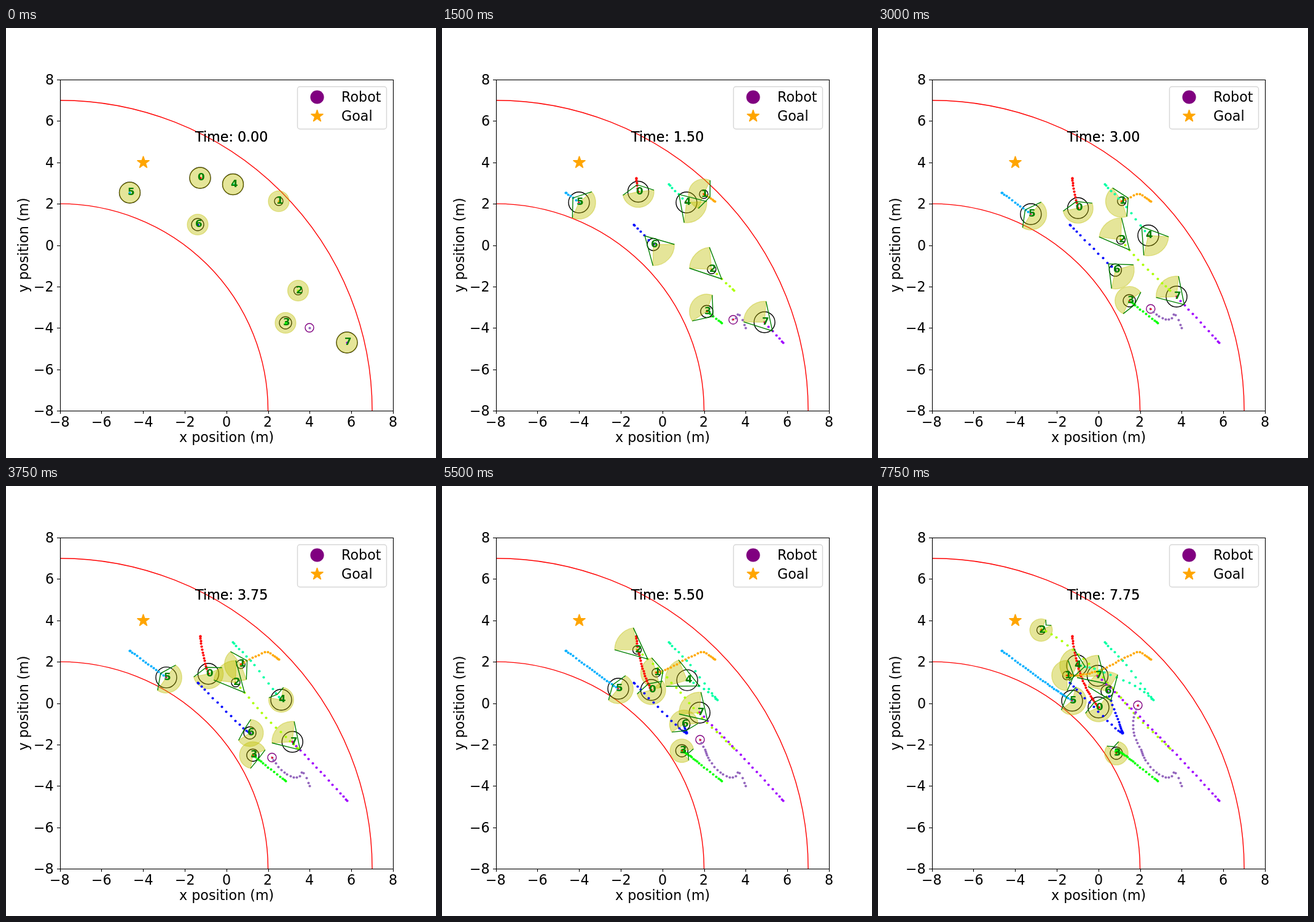
An HTML page with a canvas for the animation above (8 s loop, 700 px wide and 700 px high).

```html
<!DOCTYPE html>
<html>
<head>
<meta charset="utf-8">
<style>
  html, body { margin: 0; width: 100%; height: 100%; overflow: hidden; background: #fff; }
  canvas { display: block; }
</style>
</head>
<body>
<canvas id="stage" width="700" height="700"></canvas>
<script>
const ctx = document.getElementById('stage').getContext('2d');
const STEP = 0.25, LOOP = 8, METRE = 33.8, TAU = 2 * Math.PI;
const LEFT = 87.5, TOP = 84, WIDTH = 542.5, HEIGHT = 539, BOTTOM = TOP + HEIGHT;
const px = x => LEFT + (x + 8) / 16 * WIDTH;
const py = y => BOTTOM - (y + 8) / 16 * HEIGHT;
const snap = v => Math.floor(v) + 0.5;

// A path is a few points [time, x, y], passed smoothly from a standing start.
const walker = (radius, ...path) => ({ radius, path });

// Pedestrians cover 36% of the first leg in half its time while speeding up.
function pedestrian(radius, start, next, ...rest) {
  const half = start.map((v, i) => v + (i ? 0.36 : 0.5) * (next[i] - v));
  return walker(radius, start, half, next, ...rest);
}

const people = [
  pedestrian(17, [0, 316, 244], [1.5, 319.5, 266.5], [7.75, 359, 360.5]),
  pedestrian(7, [0, 444, 282], [1.5, 426, 270.5], [2.5, 406.5, 277.5], [4.75, 363, 299.5], [7.75, 307.5, 308.5]),
  pedestrian(7, [0, 475.5, 427.5], [1.5, 439, 393], [4.75, 343, 289], [6.5, 282, 241], [6.75, 273, 236], [7.25, 267.5, 234], [7.75, 265.5, 234.5]),
  pedestrian(10, [0, 455, 480], [1.5, 431, 461.5], [4.75, 394.5, 433], [7.75, 388, 435]),
  pedestrian(17, [0, 369.5, 254.5], [1.5, 398, 284], [3.25, 444, 343], [3.75, 448, 348], [4.75, 426, 330], [6.5, 360, 300.5], [7.75, 324, 292]),
  pedestrian(17, [0, 201.5, 268], [1.5, 223, 284], [7.75, 316, 349.5]),
  pedestrian(10, [0, 312, 320], [1.5, 344, 352.5], [3.25, 391, 398], [3.75, 397, 402], [4.75, 396.5, 397], [7.75, 373, 334]),
  pedestrian(17, [0, 555, 512], [1.5, 525, 479], [7.75, 357.5, 309])
];
people.forEach((p, i) => p.color = `hsl(${i * 39.7}, 100%, 50%)`);

const robot = walker(7, [0, 494, 488], [1, 481, 466], [1.25, 478, 472], [2.5, 453, 466],
  [3.75, 433, 442], [4.75, 428, 429], [6, 416, 401], [7.75, 423, 357]);
robot.color = '#9467bd';

const chord = (path, i, c) => (path[i + 1][c] - path[i][c]) / (path[i + 1][0] - path[i][0]);

function slope(path, i, c) {
  if (i === 0) return 0;
  if (i === path.length - 1) return 2 * chord(path, i - 1, c) - slope(path, i - 1, c);
  const before = path[i][0] - path[i - 1][0], after = path[i + 1][0] - path[i][0];
  return (chord(path, i - 1, c) * after + chord(path, i, c) * before) / (before + after);
}

// Cubic Hermite interpolation.
function positionAt(path, t) {
  let i = 0;
  while (i < path.length - 2 && t >= path[i + 1][0]) i++;
  const h = path[i + 1][0] - path[i][0], u = (t - path[i][0]) / h;
  return [1, 2].map(c => {
    const a = path[i][c], d = path[i + 1][c] - a;
    const m = slope(path, i, c) * h, n = slope(path, i + 1, c) * h;
    return a + u * (m + u * (3 * d - 2 * m - n + u * (m + n - 2 * d)));
  });
}

// Speed and heading come from the latest step.
function stateAt({ path }, t) {
  const [x, y] = positionAt(path, t), [x0, y0] = positionAt(path, Math.max(0, t - STEP));
  return { x, y, speed: Math.hypot(x - x0, y - y0) / STEP / METRE, heading: Math.atan2(y - y0, x - x0) };
}

function circle(x, y, r, fill, stroke) {
  ctx.beginPath();
  ctx.arc(x, y, r, 0, TAU);
  if (fill) { ctx.fillStyle = fill; ctx.fill(); }
  if (stroke) { ctx.strokeStyle = stroke; ctx.stroke(); }
}

function polyline(color, ...points) {
  ctx.strokeStyle = color;
  ctx.beginPath();
  points.forEach(p => ctx.lineTo(...p));
  ctx.stroke();
}

// The anchor is 0 for left, 0.5 for centre and 1 for right.
function text(str, x, y, anchor = 0, font = '22.22px', color = '#000') {
  ctx.font = font + ' "DejaVu Sans", sans-serif';
  ctx.fillStyle = color;
  ctx.fillText(str, Math.round(x - anchor * ctx.measureText(str).width), Math.round(y));
}

function star(x, y) {
  ctx.fillStyle = ctx.strokeStyle = '#ffa500';
  ctx.lineWidth = 1.4;
  ctx.lineJoin = 'bevel';
  ctx.beginPath();
  for (let i = 0; i < 10; i++) {
    const r = i % 2 ? 4 : 10.4, a = i * TAU / 10 - TAU / 4;
    ctx.lineTo(x + r * Math.cos(a), y + r * Math.sin(a));
  }
  ctx.closePath();
  ctx.fill();
  ctx.stroke();
  ctx.lineJoin = 'miter';
}

// The faster someone walks, the longer and narrower the personal space.
function spaceOf({ x, y, speed, heading }) {
  const half = TAU / 24 + 11 * TAU / 24 * Math.exp(-1.4 * speed);
  const reach = (0.5 + 0.43 * speed) * METRE;
  const back = (0.36 - 0.25 * speed + 0.36 * speed * speed) * METRE;
  const polar = (r, a) => [x + r * Math.cos(a), y + r * Math.sin(a)];
  return {
    half, reach,
    outline: [polar(reach, heading - half), polar(-back, heading), polar(reach, heading + half)]
  };
}

function drawSpace(s) {
  const { half, reach } = spaceOf(s);
  ctx.globalAlpha = 0.4;
  ctx.fillStyle = ctx.strokeStyle = '#bfbf00';
  ctx.beginPath();
  if (s.speed) ctx.moveTo(s.x, s.y);
  ctx.arc(s.x, s.y, reach, s.heading - half, s.heading + half);
  ctx.closePath();
  ctx.fill();
  ctx.stroke();
  ctx.globalAlpha = 1;
}

function drawTrail({ path, color }, t) {
  for (let k = 0; k <= t; k += STEP) {
    const [x, y] = positionAt(path, k);
    circle(snap(x), snap(y), 2.05, color);
  }
}

function drawArrow({ x, y, speed, heading }) {
  if (!speed) return;
  ctx.fillStyle = '#f00';
  ctx.beginPath();
  for (const a of [0, 2.4, -2.4])
    ctx.lineTo(x + 2.3 * Math.cos(heading + a), y + 2.3 * Math.sin(heading + a));
  ctx.fill();
}

function drawAxes() {
  ctx.lineWidth = 1.1;
  ctx.strokeStyle = '#000';
  ctx.strokeRect(88.5, 84.5, 542, HEIGHT);
  for (let n = -8; n <= 8; n += 2) {
    const label = String(n).replace('-', '\u2212');
    const x = snap(px(n) + 0.5), y = snap(py(n) + 0.5);
    polyline('#000', [x, BOTTOM], [x, BOTTOM + 5]);
    polyline('#000', [88, y], [83, y]);
    text(label, px(n), 649, 0.5);
    text(label, 78, py(n) + 8, 1);
  }
  text('x position (m)', 358.75, 674, 0.5);
  ctx.save();
  ctx.translate(36, 353.5);
  ctx.rotate(-TAU / 4);
  text('y position (m)', 0, 0, 0.5);
  ctx.restore();
}

function drawLegend() {
  ctx.lineWidth = 1.4;
  ctx.beginPath();
  ctx.roundRect(474.5, 95.5, 145, 69, 4);
  ctx.fillStyle = 'rgba(255,255,255,.8)';
  ctx.strokeStyle = '#d6d6d6';
  ctx.fill();
  ctx.stroke();
  circle(506.5, 112.5, 11.1, '#800080');
  star(506.5, 143.5);
  text('Robot', 546, 120);
  text('Goal', 546, 151);
}

function draw(t) {
  ctx.fillStyle = '#fff';
  ctx.fillRect(0, 0, 700, 700);
  ctx.lineWidth = 1.4;
  const states = people.map(p => stateAt(p, t));
  const bot = stateAt(robot, t);

  ctx.strokeStyle = '#f00';
  for (const r of [10, 15]) {
    ctx.beginPath();
    ctx.ellipse(LEFT, BOTTOM, r / 16 * WIDTH, r / 16 * HEIGHT, 0, -TAU / 4, 0);
    ctx.stroke();
  }
  ctx.fillStyle = '#fff';
  ctx.fillRect(80, TOP, 8, HEIGHT);

  people.forEach((p, i) => circle(states[i].x, states[i].y, p.radius, null, '#000'));
  states.forEach(drawSpace);
  circle(bot.x, bot.y, robot.radius, null, '#800080');

  [...people, robot].forEach(p => drawTrail(p, t));
  for (const s of states)
    if (s.speed) polyline('#008000', ...spaceOf(s).outline);
  [...states, bot].forEach(drawArrow);
  star(223.5, 219);

  drawAxes();
  states.forEach((s, i) => text(i, s.x - 3.6, s.y + 4, 0, 'bold 16.67px', '#008000'));
  for (let pass = 0; pass < 2; pass++) text('Time: ' + t.toFixed(2), 308, 185);
  drawLegend();
}

function tick() {
  const seconds = performance.now() / 1000 % LOOP;
  draw(Math.floor(seconds / STEP) * STEP);
  requestAnimationFrame(tick);
}
tick();
</script>
</body>
</html>
```
